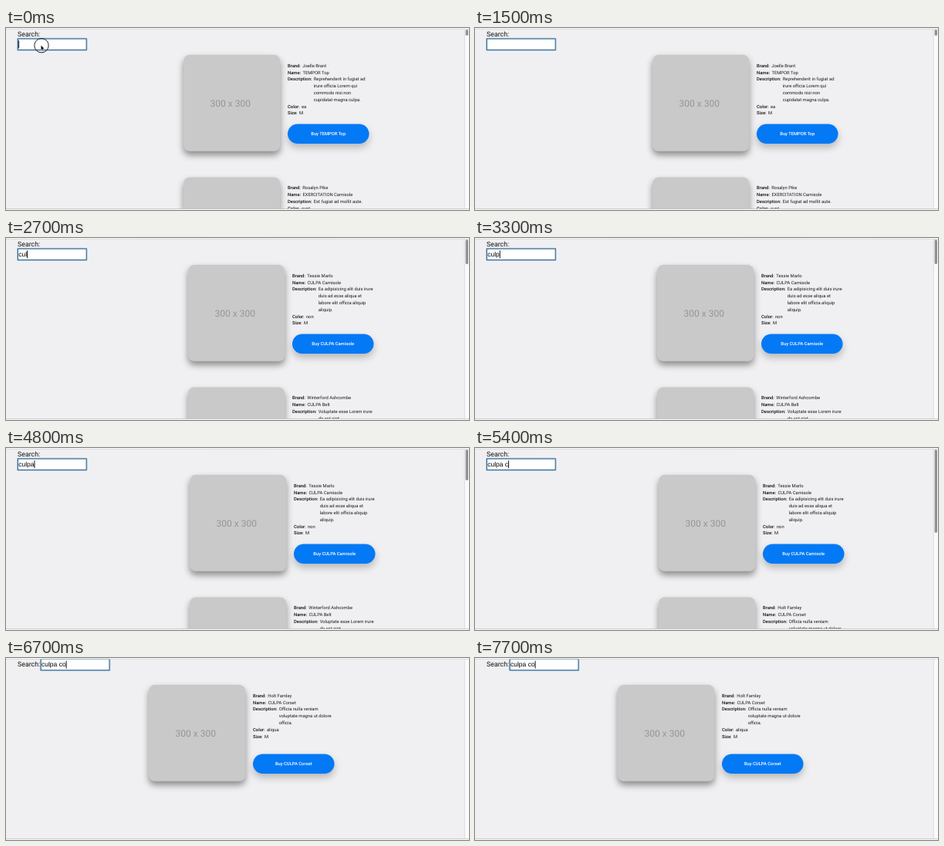
Write an HTML page that moves like this. It is 600 px wide and 236 px high and loops after 8100 ms.

```html
<!DOCTYPE html>
<html lang="en">
<head>
<meta charset="utf-8">
<title>Product search</title>
<style>
  html, body { margin: 0; width: 100%; height: 100%; overflow: hidden; background: #f0f0f2; }
  svg { display: block; width: 100%; height: 100%; text-rendering: geometricPrecision; }
  text { font: 5.85px Roboto, sans-serif; fill: #1c1c1e; white-space: pre; }
  .label { font-weight: 500; fill: #111; }
  .buy { font-weight: 500; font-size: 5.8px; fill: #fff; text-anchor: middle; }
  .size { font-size: 12px; fill: #969696; text-anchor: middle; }
  .search { font-size: 8.8px; fill: #111; }
  .typed { font: 8.5px "Liberation Sans", Arial, sans-serif; fill: #000; }
  .photo { filter: drop-shadow(0 5px 4px rgba(0, 0, 0, .42)); }
  .button { filter: drop-shadow(0 5px 5px rgba(0, 0, 0, .24)); }
</style>
</head>
<body>
<svg viewBox="0 0 600 236" preserveAspectRatio="none">
  <rect width="600" height="236" fill="#f0f0f2"/>
  <g id="list"></g>
  <text id="label" class="search" x="15">Search:</text>
  <g id="field">
    <rect x="-.2" y="-.2" width="90" height="15.6" rx="1" fill="none" stroke="#a9c8e4" stroke-width="1.4"/>
    <rect x=".4" y=".4" width="88.8" height="14.4" fill="#fff" stroke="#3f7096" stroke-width="1.2"/>
    <text id="typed" class="typed" x="1.2" y="10.4"></text>
    <rect id="caret" y="2.6" width=".9" height="10" fill="#000"/>
  </g>
  <g id="pointer">
    <circle id="ring" cx="46" cy="22.7" r="9.2" fill="none" stroke="#222" stroke-width="1"/>
    <path d="M45.3 22.3v6.4l1.5-1.3 1 2.3 1-.4-1-2.3h2z" fill="#000" stroke="#fff" stroke-width=".4"/>
  </g>
  <rect x="594" y="1" width="6" height="234" fill="#fafafa"/>
  <path d="M594.3 1V235" stroke="#d6d6d9" stroke-width=".8"/>
  <rect id="thumb" x="595.6" y="2" width="3.4" rx="1.7" fill="#919193"/>
  <rect width="600" height="1" fill="#fff"/>
  <path d="M0 1.3H600" stroke="#d4d4d7" stroke-width=".8"/>
  <rect y="235" width="600" height="1" fill="#fff"/>
  <path d="M0 234.6H600" stroke="#c3c3c7" stroke-width=".9"/>
</svg>
<script>
const LOOP = 8100, ROW = 8.8, CARD = 158.6;
const $ = id => document.getElementById(id);

const item = (brand, name, lines, color, size) => ({ brand, name, lines, color, size });
const items = {
  top: item('Joelle Brant', 'TEMPOR Top',
    ['Reprehenderit in fugiat ad', 'irure officia Lorem qui', 'commodo nisi non', 'cupidatat magna culpa.'], 'ea', 'M'),
  exer: item('Rosalyn Pike', 'EXERCITATION Camisole', ['Est fugiat ad mollit aute.'], 'sunt', 'S'),
  blouse: item('Brock Maccurdane', 'UT Blouse',
    ['Nisi mollit aliqua sunt', 'excepteur voluptate.'], 'ullamco', 'S'),
  camisole: item('Tessie Marlo', 'CULPA Camisole',
    ['Ea adipisicing elit duis irure', 'duis ad esse aliqua et', 'labore elit officia aliquip', 'aliquip.'], 'non', 'M'),
  belt: item('Winterford Ashcombe', 'CULPA Belt', ['Voluptate esse Lorem irure', 'do est sint'], 'ea', 'L'),
  corset: item('Holt Farnley', 'CULPA Corset',
    ['Officia nulla veniam', 'voluptate magna ut dolore', 'officia.'], 'aliqua', 'M')
};

// Result lists: start time, left edge, scrollbar thumb height, visible items
const lists = [
  [0, 230, 8, ['top', 'exer']],
  [2200, 230, 8, ['blouse', 'camisole']],
  [2700, 236, 32, ['camisole', 'belt']],
  [3400, 238, 40, ['camisole', 'belt']],
  [5400, 238, 108, ['camisole', 'corset']],
  [5700, 185, 0, ['corset']]
];
const typing = [[0, ''], [1700, 'c'], [2100, 'cu'], [2700, 'cul'], [3300, 'culp'],
  [3800, 'culpa'], [4900, 'culpa '], [5300, 'culpa c'], [5700, 'culpa co']];
const caretOff = [[500, 1000], [1500, 1700], [3200, 3300], [4300, 4800], [6200, 6700], [7200, 7700]];
const clicks = [[0, 100], [1000, 1100]];

const latest = (steps, t) => steps.filter(s => s[0] <= t).pop();
const within = (spans, t) => spans.some(([a, b]) => t >= a && t < b);
const show = (el, on) => el.setAttribute('visibility', on ? 'visible' : 'hidden');

function field(row, label, value) {
  return `<text x="135" y="${50.7 + row * ROW}"><tspan class="label">${label}:</tspan><tspan dx="2.3">${value}</tspan></text>`;
}

function card({ brand, name, lines, color, size }, x, index) {
  const n = lines.length;
  const rest = lines.slice(1).map((line, i) =>
    `<text x="168.7" y="${50.7 + (3 + i) * ROW}">${line}</text>`).join('');
  return `<g transform="translate(${x} ${index * CARD})">
    <rect class="photo" y="34.8" width="125.3" height="125" rx="8" fill="#c9c9c9"/>
    <text class="size" x="60.7" y="102.4">300 x 300</text>
    ${field(0, 'Brand', brand)}${field(1, 'Name', name)}${field(2, 'Description', lines[0])}${rest}
    ${field(2 + n, 'Color', color)}${field(3 + n, 'Size', size)}
    <rect class="button" x="135" y="124.4" width="105.5" height="25.6" rx="12.8" fill="#0479f5"/>
    <text class="buy" x="187.7" y="139.1">Buy ${name}</text>
  </g>`;
}

let shown;
function draw(t) {
  const list = latest(lists, t);
  if (list !== shown) {
    shown = list;
    const [, x, thumb, keys] = list;
    $('list').innerHTML = keys.map((key, i) => card(items[key], x, i)).join('');
    $('thumb').setAttribute('height', thumb);
  }
  // With a single result the label and the field share one line
  const inline = t >= 5700;
  $('label').setAttribute('y', inline ? 11.4 : 10.5);
  $('field').setAttribute('transform', inline ? 'translate(44.8 1)' : 'translate(15 13.6)');

  const typed = latest(typing, t)[1];
  $('typed').textContent = typed;
  $('caret').setAttribute('x', 1.2 + (typed ? $('typed').getComputedTextLength() : 0));
  show($('caret'), !within(caretOff, t));
  show($('pointer'), t < 1500);
  show($('ring'), within(clicks, t));
}

const start = performance.now();
function tick() {
  draw((performance.now() - start) % LOOP);
  requestAnimationFrame(tick);
}
tick();
</script>
</body>
</html>
```
